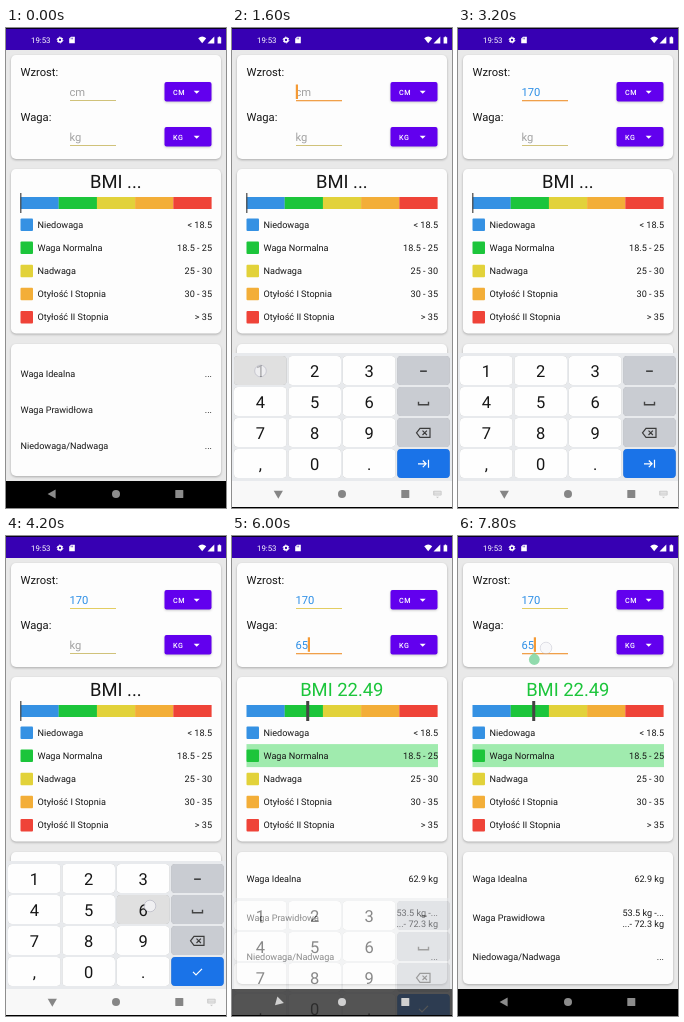
Recreate the animation shown at these times as an HTML page. Size 220 by 480 pixels, loop 8 s.

```html
<!DOCTYPE html>
<html lang="pl">
<head>
<meta charset="utf-8">
<title>BMI</title>
<style>
  html, body { margin: 0; width: 100%; height: 100%; overflow: hidden; background: #e9e9e9; }
  svg { display: block; width: 100%; height: 100%; }
  text { font-family: Roboto, sans-serif; font-size: 9.1px; fill: #161616; white-space: pre; text-rendering: geometricPrecision; }
  .end { text-anchor: end; }
  .mid { text-anchor: middle; }
  .field { font-size: 11.2px; }
  .digit { font-size: 16.5px; text-anchor: middle; }
  .card { fill: #fdfdfd; filter: drop-shadow(0 1px 1px #0004); }
  .button { fill: #6200ee; filter: drop-shadow(0 1px 1px #0003); }
  .key { filter: drop-shadow(0 .6px .3px #0004); }
</style>
</head>
<body>
<svg id="stage" viewBox="0 0 220 480" xmlns="http://www.w3.org/2000/svg"></svg>
<script>
const LOOP = 8000, STEP = 200;
const bands = [
  ['Niedowaga', '&lt; 18.5', '#3591e3'],
  ['Waga Normalna', '18.5 - 25', '#1cc53b'],
  ['Nadwaga', '25 - 30', '#e2d23a'],
  ['Otyłość I Stopnia', '30 - 35', '#f3ae38'],
  ['Otyłość II Stopnia', '&gt; 35', '#ef4338'],
];
const tints = ['#a9d2f5', '#a0ebae'];
const keyRows = ['123−', '456␣', '789⌫', ',0.→'];

// [from, to, x, y, opacity, pressed key]
const touches = [
  [400, 600, 86, 64, 0.9], [600, 800, 86, 64, 0.4],
  [1600, 1800, 28.5, 343, 0.8, '1'],
  [2200, 2400, 29, 405, 0.9, '7'],
  [2600, 2800, 84, 436, 0.9, '0'], [2800, 3000, 84, 436, 0.4],
  [3400, 3600, 192, 436, 0.9, '→'], [3600, 3800, 192, 436, 0.4],
  [4000, 4400, 144, 370, 0.9, '6'],
  [4600, 4800, 83, 376, 0.9, '5'], [4800, 5000, 83, 376, 0.6],
  [5800, 6000, 46, 466, 0.6],
  [7600, 8000, 88, 112, 0.6],
];
const caretOn = [[800, 1200], [1600, 3000], [3600, 4000], [4400, 5400],
                 [5800, 6400], [6800, 7400], [7600, 8000]];

const rect = (x, y, w, h, fill, more = '') =>
  `<rect x="${x}" y="${y}" width="${w}" height="${h}" fill="${fill}" ${more}/>`;
const text = (x, y, value, more = '') => `<text x="${x}" y="${y}" ${more}>${value}</text>`;
const path = (d, more = '') => `<path d="${d}" ${more}/>`;
const line = (d, color, width = 1) =>
  path(d, `fill="none" stroke="${color}" stroke-width="${width}"`);
const card = (y, h) => rect(5, y, 210, h, '', 'rx="5" class="card"');

function statusBar() {
  return rect(0, 0, 220, 22, '#3700b3') +
    text(25, 14.8, '19:53', 'style="font-size:7.8px;fill:#fff"') +
    '<circle cx="54" cy="12" r="1.9" fill="none" stroke="#fff" stroke-width="1.5"/>' +
    '<circle cx="54" cy="12" r="2.9" fill="none" stroke="#fff" stroke-width="1" stroke-dasharray="1.5 1.54"/>' +
    path('M65 8.8h3.8v6.4h-5.6v-4.6z', 'fill="#fff"') +
    line('M65.2 9.7v1.6M66.6 9.7v1.6', '#3700b3', 0.6) +
    path('M192.2 10.3q4-3.4 8 0l-4 5z', 'fill="#fff"') +
    path('M208.3 8.6v6.8h-6.8z', 'fill="#fff"') +
    path('M212.7 8.4h1.4v.8h1.1v6.3h-3.6v-6.3h1.1z', 'fill="#fff"');
}

function inputRow(y, label, unit, id) {
  return text(14.5, y + 4, label, 'class="field"') +
    text(63.5, y + 24, '', `class="field" id="${id}"`) +
    rect(64, y + 28, 46, 1, '', `id="${id}Line"`) +
    rect(158.5, y + 10, 47, 19.5, '', 'rx="2" class="button"') +
    text(167, y + 22.6, unit, 'style="font-size:7.2px;font-weight:500;letter-spacing:.5px;fill:#fff"') +
    path(`M187.7 ${y + 18.7}h6l-3 3z`, 'fill="#fff"');
}

function bandRows() {
  return bands.map(([name, range, color], i) => {
    const y = 197 + i * 23.1;
    return rect(14.5, y - 12, 191.5, 23, 'none', `id="band${i}"`) +
      rect(14.5, y - 6.5, 12.5, 12.5, color, 'rx="1"') +
      text(31.5, y + 3, name) + text(206, y + 3, range, 'class="end"') +
      rect(14.5 + i * 38.2, 169, 38.3, 12, color);
  }).join('');
}

function keyFace(label, x, y) {
  if (label === '␣') return line(`M${x - 5} ${y}v3h10v-3`, '#444', 1.4);
  if (label === '⌫') return line(`M${x - 7} ${y}l3.5-4.5h10v9h-10zM${x - 1} ${y - 2.2}l4.4 4.4m0-4.4l-4.4 4.4`, '#3c3c3c', 1.2);
  if (label === '→') {
    return `<g id="next">${line(`M${x - 5.5} ${y}h8m-3.2-3.3l3.3 3.3l-3.3 3.3M${x + 5} ${y - 4}v8`, '#fff', 1.2)}</g>` +
      `<g id="done">${line(`M${x - 4.5} ${y}l3 3l6-6`, '#fff', 1.2)}</g>`;
  }
  return text(x, y + 5.8, label, 'class="digit"');
}

function keyboard() {
  let out = rect(0, 325, 220, 195, '#e8eaed') + rect(0, 453, 220, 67, '#f8f8f8');
  keyRows.forEach((row, r) => [...row].forEach((label, c) => {
    const x = 2 + c * 54.4, y = 328 + r * 31;
    const fill = label === '→' ? '#1a73e8' : c === 3 ? '#c9ccd2' : '#fefefe';
    out += rect(x, y, 52.6, 29, fill, `rx="4" class="key" data-key="${label}"`) +
      keyFace(label, x + 26.3, y + 14.8);
  }));
  return `<g id="keyboard">${out}</g>`;
}

function navBar() {
  return rect(0, 453, 220, 27, '#000', 'id="navShade"') +
    '<g id="navIcons">' +
    path('M41.6 466l8-4.6v9.2z', 'id="back"') +
    '<circle cx="110" cy="466" r="4"/><rect x="169.3" y="462" width="8" height="8" rx=".6"/></g>' +
    '<g id="switcher">' + rect(201.2, 462.8, 8.4, 4.8, '#c8c8c8', 'rx=".8"') +
    line('M202.3 464.2h6.4M202.3 466h6.4', '#f8f8f8', 0.8) +
    path('M204 468.8h3l-1.5 1.5z', 'fill="#c8c8c8"') + '</g>';
}

document.getElementById('stage').innerHTML =
  rect(0, 0, 220, 480, '#e9e9e9') + statusBar() +
  card(27, 104) + inputRow(44, 'Wzrost:', 'CM', 'height') + inputRow(89, 'Waga:', 'KG', 'weight') +
  rect(0, 0, 2.2, 14.5, '#f59a35', 'id="caret"') +
  '<g id="handle" fill="#7fd6a0" opacity=".85"><circle cx="76.3" cy="123.5" r="5.4"/><path d="M76.3 116.5l4.2 4h-8.4z"/></g>' +
  card(141, 164.5) + text(109.8, 160.4, '', 'id="bmi" class="mid" style="font-size:18.4px"') + bandRows() +
  rect(14, 165, 3, 20, '#444', 'id="needle"') +
  card(316, 132) +
  ['Waga Idealna', 'Waga Prawidłowa', 'Niedowaga/Nadwaga'].map((name, i) =>
    text(14.5, 0, name, `id="name${i}"`) + text(206, 0, '', `id="result${i}" class="end"`)).join('') +
  text(206, 391, '...- 72.3 kg', 'id="upper" class="end"') +
  keyboard() + navBar() +
  rect(0, 0, 220, 0.8, '#000') + rect(0, 479, 220, 1, '#000') +
  '<circle id="touch" r="5.8" fill="#f4f5f8" fill-opacity=".85" stroke="#aab" stroke-width=".6"/>';

const $ = id => document.getElementById(id);
const set = (id, attrs) => Object.entries(attrs).forEach(([k, v]) => $(id).setAttribute(k, v));
const show = (id, on) => set(id, { visibility: on ? 'visible' : 'hidden' });
const within = (t, [from, to]) => t >= from && t < to;
const keys = [...document.querySelectorAll('[data-key]')];

function drawFields(t) {
  const height = t < 1800 ? '' : t < 2400 ? '1' : t < 2800 ? '17' : '170';
  const weight = t < 4400 ? '' : t < 4800 ? '6' : '65';
  const focus = t < 600 ? '' : t < 3600 ? 'height' : 'weight';
  const lit = focus === 'weight' && !weight ? '' : focus;
  [['height', height, 'cm'], ['weight', weight, 'kg']].forEach(([id, value, hint]) => {
    $(id).textContent = value || hint;
    $(id).style.fill = value ? '#2d8fe6' : '#a2a2a2';
    const active = id === lit;
    set(id + 'Line', { fill: active ? '#f0a04a' : value ? '#e3cd62' : '#d0c27a', height: active ? 1.3 : 1 });
  });
  const chars = (focus === 'weight' ? weight : height).length;
  set('caret', { x: 63.8 + chars * 6, y: focus === 'weight' ? 101.3 : 56.5 });
  show('caret', caretOn.some(span => within(t, span)));
  show('handle', t >= 7600);
  return weight;
}

function drawResult(weight) {
  const bmi = weight / 1.7 ** 2;
  const band = !weight ? -1 : bmi < 18.5 ? 0 : 1;
  $('bmi').textContent = weight ? 'BMI ' + bmi.toFixed(2) : 'BMI ...';
  $('bmi').style.fill = band < 0 ? '#161616' : bands[band][2];
  bands.forEach((_, i) => set('band' + i, { fill: i === band ? tints[i] : 'none' }));
  const share = band === 1 ? 0.2 + 0.2 * (bmi - 18.5) / 6.5 : 0.2 * bmi / 18.5;
  set('needle', { x: weight ? 12.4 + share * 191.5 : 14.2, width: weight ? 3 : 1.2 });
  const gap = weight ? 39 : 36;
  const values = weight ? ['62.9 kg', '53.5 kg -...', '...'] : ['...', '...', '...'];
  values.forEach((value, i) => {
    const y = 385.2 + (i - 1) * gap;
    set('name' + i, { y });
    set('result' + i, { y: weight && i === 1 ? 380.2 : y });
    $('result' + i).textContent = value;
  });
  show('upper', weight);
}

function drawKeyboard(t) {
  const moving = within(t, [800, 1000]) || within(t, [6000, 6200]);
  const open = within(t, [1000, 6000]);
  show('keyboard', open || moving);
  set('keyboard', { transform: `translate(0 ${moving ? 37 : 0})`, opacity: moving ? 0.5 : 1 });
  set('navShade', { opacity: open ? 0 : moving ? 0.65 : 1 });
  set('navIcons', { fill: open ? '#868686' : moving ? '#d0d0d0' : '#8c8c8c' });
  set('back', { transform: `rotate(${open ? -90 : moving ? -45 : 0} 46.3 466)` });
  show('switcher', open);
  $('next').style.display = t < 3600 ? '' : 'none';
  $('done').style.display = t < 3600 ? 'none' : '';
}

function drawTouch(t) {
  const touch = touches.find(span => within(t, span));
  show('touch', touch);
  if (touch) set('touch', { cx: touch[2], cy: touch[3], opacity: touch[4] });
  keys.forEach(key => {
    const pressed = touch && touch[5] === key.dataset.key;
    key.style.fill = !pressed ? '' : touch[5] === '→' ? '#1765cc' : '#e0e0e0';
  });
}

function render(now) {
  const t = Math.floor(now % LOOP / STEP) * STEP;
  drawResult(drawFields(t));
  drawKeyboard(t);
  drawTouch(t);
}

let start;
function tick(now) {
  start ??= now;
  render(now - start);
  requestAnimationFrame(tick);
}
render(0);
requestAnimationFrame(tick);
</script>
</body>
</html>
```
